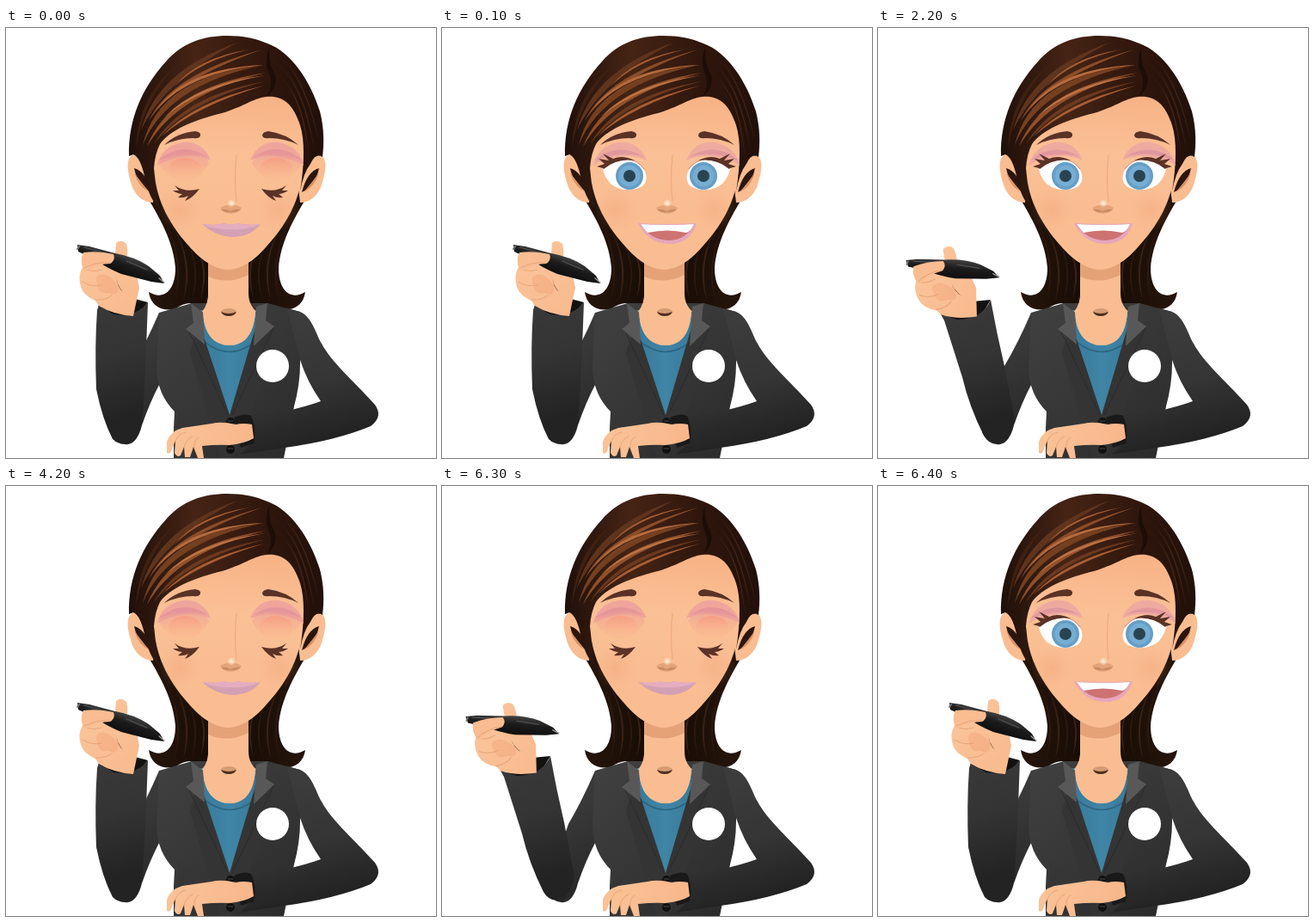
Write an HTML page with a canvas that moves like this. It is 500 px wide and 500 px high and loops after 8 s.

```html
<!DOCTYPE html>
<html lang="en">
<head>
<meta charset="utf-8">
<title>Blinking presenter</title>
<style>
html, body { margin: 0; width: 100%; height: 100%; overflow: hidden; background: #fff; }
canvas { display: block; width: 500px; height: 500px; }
</style>
</head>
<body>
<canvas id="stage" width="500" height="500"></canvas>
<script>
const ctx = document.getElementById('stage').getContext('2d');
const LOOP = 8000;
const SKIN = '#f9bd91', SKIN_SHADE = '#e7a579', LASH = '#5a3226';
const ELBOW = [134, 475];

// The forearm is either upright or leaning out, with the hand turned to suit.
const UPRIGHT = {
  turn: 0, shift: [0, 0],
  cuff: 'M107 323L150 315L165 319L150 337L125 335Z',
  sleeve: 'M108 322L106 328Q103 370 105 420Q112 455 124 478Q132 486 144 483Q154 480 159 455L163 372L165 319Q152 336 125 333Z'
};
const LEANING = {
  turn: -13.5, shift: [0, 0],
  cuff: 'M73 333L110 318L131 316L118 338L85 340Z',
  sleeve: 'M73 333L77 340L98 406Q106 440 123 474Q130 486 142 483Q154 481 159 455L147 393Q138 355 131 316Q122 338 92 339Z'
};
const REACHING = { ...LEANING, shift: [-5, -2] };

// Each pose holds until the next one starts.
const POSES = [
  { at: 0, open: false, arm: UPRIGHT },
  { at: 100, open: true, arm: UPRIGHT },
  { at: 2100, open: false, arm: LEANING },
  { at: 2200, open: true, arm: LEANING },
  { at: 4200, open: false, arm: UPRIGHT },
  { at: 4300, open: true, arm: UPRIGHT },
  { at: 6300, open: false, arm: REACHING },
  { at: 6400, open: true, arm: UPRIGHT }
];

function fill(d, colour) {
  ctx.fillStyle = colour;
  ctx.fill(new Path2D(d));
}

function line(d, colour, width = 1) {
  ctx.strokeStyle = colour;
  ctx.lineWidth = width;
  ctx.lineCap = 'round';
  ctx.stroke(new Path2D(d));
}

function oval(x, y, rx, ry, colour) {
  ctx.fillStyle = colour;
  ctx.beginPath();
  ctx.ellipse(x, y, rx, ry, 0, 0, Math.PI * 2);
  ctx.fill();
}

function blend(x0, y0, x1, y1, ...colours) {
  const g = ctx.createLinearGradient(x0, y0, x1, y1);
  colours.forEach((c, i) => g.addColorStop(i / (colours.length - 1), c));
  return g;
}

function glow(x, y, r, rgb, alpha) {
  const g = ctx.createRadialGradient(x, y, 0, x, y, r);
  g.addColorStop(0, `rgba(${rgb},${alpha})`);
  g.addColorStop(1, `rgba(${rgb},0)`);
  oval(x, y, r, r, g);
}

// A curved lock of hair, pointed at both ends.
function lock(x0, y0, cx, cy, x1, y1, w, colour) {
  fill(`M${x0} ${y0}Q${cx - w} ${cy - w} ${x1} ${y1}Q${cx + w} ${cy + w} ${x0} ${y0}Z`, colour);
}

function mirrored(axis, draw) {
  draw();
  ctx.save();
  ctx.translate(axis * 2, 0);
  ctx.scale(-1, 1);
  draw();
  ctx.restore();
}

function backHair() {
  mirrored(257, () => {
    fill('M160 190C180 222 195 250 197 279C197 306 183 317 166 307C168 322 180 330 196 327Q206 320 214 320Q222 326 236 321L250 260L190 150Z',
      blend(175, 0, 240, 0, '#24140b', '#170c06'));
    for (let i = 0; i < 4; i++) {
      const x = 182 + i * 10;
      lock(x, 218 + i * 9, x + 27, 270, x + 14, 318 - i, 2.5, i % 2 ? '#3a2113' : '#2c180d');
    }
  });
}

function ears() {
  mirrored(256.5, () => {
    fill('M148 147C140 151 140 162 145 179C149 195 160 203 171 203L176 160Z', SKIN);
    fill('M149 163Q163 167 169 191Q153 183 149 163Z', '#2b150d');
    fill('M149 168Q156 178 167 191Q154 185 149 168Z', '#d99268');
  });
}

function neck() {
  fill('M235 262V312Q234 326 222 336L240 375H280L294 332Q282 324 282 308V262Z', SKIN);
  fill('M235 272Q258 288 282 272V287Q258 299 235 289Z', '#e5a276');
  oval(259, 330, 9, 4, '#d59c74');
  fill('M250 330Q259 334 268 330Q266 335 259 335Q252 335 250 330Z', '#50301f');
}

function face() {
  fill('M172 148C170 190 185 220 207 247C222 265 238 280 258 281C279 280 294 265 309 247C332 220 346 190 346 148C350 105 325 72 300 74L180 112Z',
    blend(270, 80, 258, 280, '#f7b386', '#fbc095', SKIN, SKIN));
  glow(202, 211, 25, '239,145,105', 0.24);
  glow(317, 211, 25, '239,145,105', 0.22);
  line('M268 148Q265 175 268 201', '#efaa7e', 1.2);
  fill('M249 209Q256 205 262 206Q268 205 274 209Q271 215 262 216Q253 216 249 209Z', '#e5a47a');
  fill('M250 211Q256 210 261 213Q267 210 273 211Q268 215 261 214Q254 215 250 211Z', '#c98b64');
  glow(262, 204, 5, '255,246,226', 0.95);
  fill('M184 136Q198 122 220 120Q227 121 226 125Q225 129 218 128Q200 128 184 136Z', LASH);
  fill('M340 136Q326 123 305 120Q298 121 298 125Q299 129 306 128Q324 128 340 136Z', LASH);
}

function frontHair() {
  fill('M143 149C142 106 158 70 186 39C205 17 230 9 257 9C276 9 290 12 304 18C332 28 354 62 365 97C370 117 370 134 368 150Q360 145 354 158Q346 168 342 190Q350 139 342 113C333 85 319 78 302 80C287 82 275 92 251 99C218 107 190 119 179 135Q173 147 172 163L177 208Q166 198 161 172Q156 150 148 147Z',
    blend(145, 0, 369, 0, '#20100a', '#462415', '#31170d', '#211009'));
  lock(157, 119, 180, 55, 269, 17, 5, '#5f341d');
  lock(166, 108, 194, 57, 298, 25, 3, '#8b4d29');
  lock(159, 136, 183, 61, 299, 43, 5, '#754020');
  lock(176, 94, 212, 49, 299, 43, 2.4, '#b46b3e');
  lock(164, 138, 194, 73, 302, 52, 4, '#90502b');
  lock(185, 103, 223, 67, 301, 55, 2, '#bd7244');
  lock(172, 135, 207, 82, 302, 62, 3, '#6b391f');
  lock(181, 126, 219, 88, 300, 67, 2.2, '#a65d35');
  lock(196, 68, 224, 36, 283, 25, 1.5, '#a45d34');
  lock(151, 140, 157, 80, 200, 42, 3, '#40200f');
  for (let i = 0; i < 5; i++) {
    lock(309, 26 + i * 6, 344, 44 + i * 6, 364 - i * 3, 132 + i * 4, 2, i % 2 ? '#1f0f08' : '#48291a');
  }
  fill('M306 23Q300 39 305 51Q312 65 303 80Q316 69 313 55Q305 42 306 23Z', '#1d0d07');
}

function lashes(open) {
  if (open) {
    fill('M187 163L180 161L189 158L182 152L194 154L187 146L199 152Q210 147 224 154Q203 151 188 164Z', LASH);
  } else {
    fill('M225 187Q209 192 196 183L201 189L194 189Q200 193 205 193L200 197Q207 198 212 195L208 201Q217 198 225 187Z', LASH);
  }
}

function eyes(open) {
  mirrored(261, () => {
    fill('M176 160Q180 138 205 133Q229 131 238 154Q218 145 194 152Q180 156 176 160Z', open ? '#efaaa0' : '#f0a59c');
    fill('M177 154Q204 131 235 150Q210 142 177 154Z', 'rgba(205,130,155,.45)');
    if (open) {
      fill('M186 160C195 150 216 149 229 158C239 166 240 178 233 184C222 191 204 189 195 180Q188 172 186 160Z', '#fff');
      oval(218, 172, 16, 16, '#659ec6');
      oval(218, 172, 12.5, 12.5, '#76add2');
      oval(218, 172, 7, 7, '#294451');
      line('M187 160Q198 151 214 152Q228 154 235 164', '#c9877a');
    } else {
      fill('M178 158Q188 140 211 141Q230 142 236 157Q228 174 211 178Q189 178 178 158Z',
        blend(0, 140, 0, 178, 'rgba(228,146,152,.7)', 'rgba(249,176,141,.1)'));
      oval(208, 164, 19, 13, blend(0, 151, 0, 177, 'rgba(249,148,122,.6)', 'rgba(250,181,142,0)'));
    }
    lashes(open);
  });
}

function mouth(open) {
  if (!open) {
    fill('M228 228Q245 230 254 227Q261 230 269 227Q281 230 296 228Q284 243 263 243Q243 242 228 228Z', '#d4a0b3');
    fill('M228 228Q245 230 254 227Q261 230 269 227Q281 230 296 228Q281 235 262 234Q243 235 228 228Z', '#e4adc0');
    return;
  }
  fill('M228 227Q261 229 296 227Q289 251 264 251Q239 250 228 227Z', '#e8a6bb');
  fill('M231 228Q262 230 293 228Q285 246 264 247Q241 246 231 228Z', '#cd7372');
  fill('M231 228Q262 230 293 228Q289 237 284 238Q262 233 239 238Q235 234 231 228Z', '#fff');
}

function shirt() {
  const teal = blend(230, 0, 290, 0, '#397b9b', '#4085a6', '#397b9b');
  fill('M226 328H293L291 375L260 452L231 372Z', teal);
  fill('M229 330C230 358 244 369 260 369C276 369 288 358 290 330L282 318H236Z', SKIN);
  neckSkin();
  line('M231 365Q260 388 289 365', '#2d6681', 1.6);
}

// The neck is kept inside the round neckline.
function neckSkin() {
  ctx.save();
  ctx.clip(new Path2D('M200 240H320V330H290C288 358 276 369 260 369C244 369 230 358 229 330H200Z'));
  neck();
  ctx.restore();
}

function jacket() {
  fill('M178 331L216 320H304L342 330V390Q342 414 335 440L323 500H195V465L196 446Q176 426 175 396Z',
    blend(175, 320, 330, 490, '#414141', '#373737', '#2c2c2c'));
  shirt();
  fill('M231 362L260 450L262 500H250L214 378L222 350Z', '#343434');
  fill('M291 345L260 450L264 500L304 395L310 345Z', '#343434');
  line('M212 351L258 450', '#2b2b2b');
  line('M311 349L263 450', '#2b2b2b');
  fill('M215 320L229 331L231 368L209 350L218 343Z', '#585858');
  fill('M304 320L291 324L288 370L312 347L302 340Z', '#585858');
  for (const y of [458, 490]) {
    oval(261, y, 5, 5, '#111');
    line(`M258 ${y - 1}H264`, '#454545');
  }
}

function restingArm() {
  fill('M327 326L342 330C356 336 360 355 367 367C378 388 402 408 429 438Q439 452 424 463Q383 480 324 488L272 496L288 481Q289 465 282 452Q330 447 366 434Q350 411 342 386Z',
    blend(340, 340, 380, 485, '#3c3c3c', '#353535', '#202020'));
  fill('M265 453Q278 447 285 451Q292 465 288 483L273 488Z', '#191919');
  fill('M286 461Q276 459 267 461Q251 457 239 460L205 465Q191 469 187 481L187 494Q191 497 193 489L197 480L196 494Q199 500 203 497L207 487L208 499H214L218 487L223 500H230L228 486Q246 484 260 485Q278 483 288 477Z',
    blend(190, 462, 280, 490, '#fac397', '#f8b78b'));
  line('M197 480Q201 471 209 470', SKIN_SHADE);
  line('M207 488Q209 478 217 475', SKIN_SHADE);
  line('M219 488Q218 479 224 476', SKIN_SHADE);
}

function raisedArm({ turn, shift, cuff, sleeve }) {
  fill('M178 331Q163 366 147 393L121 470Q130 486 142 484Q153 482 158 462Q167 436 179 413V345Z',
    blend(145, 375, 185, 460, '#393939', '#292929'));
  ctx.save();
  ctx.translate(...shift);
  fill(cuff, '#111');
  fill(sleeve, blend(0, 340, 40, 480, '#3a3a3a', '#343434', '#232323'));
  ctx.translate(...ELBOW);
  ctx.rotate(turn * Math.PI / 180);
  ctx.translate(-ELBOW[0], -ELBOW[1]);
  hand();
  ctx.restore();
}

function hand() {
  fill('M92 260Q86 267 89 278Q83 288 87 301Q90 311 104 317L108 323Q124 333 148 335L155 302L151 282L139 274Q143 261 140 251Q134 245 128 250L127 263Z',
    blend(90, 270, 150, 330, '#fbc49a', '#f8ba8d'));
  fill('M105 290Q116 280 130 299Q133 314 119 308Q105 311 105 290Z', 'rgba(239,160,117,.4)');
  line('M90 279Q100 285 111 281', SKIN_SHADE);
  line('M89 295Q99 302 111 299', SKIN_SHADE);
  line('M104 316Q116 317 123 311', SKIN_SHADE);
  fill('M127 286Q129 299 136 307Q130 303 127 286Z', '#4b2c20');
  fill('M83 252L97 254L127 262Q150 266 166 277L179 288L184 297L169 295L134 286Q117 279 101 268L84 260Z',
    blend(130, 262, 124, 280, '#404040', '#1b1b1b', '#111'));
  line('M85 254L83 257', '#777', 2);
  line('M91 255L124 265', '#515151', 1.3);
  line('M140 271L164 281', '#494949', 1.5);
  line('M178 291L184 296', '#999', 1.4);
  fill('M90 261Q108 259 125 263Q128 270 121 274Q108 274 91 283Q85 270 90 261Z', SKIN);
  line('M91 279Q107 271 122 273', SKIN_SHADE);
}

function draw(now) {
  const time = now % LOOP;
  const pose = POSES.findLast(p => p.at <= time);
  ctx.fillStyle = '#fff';
  ctx.fillRect(0, 0, 500, 500);
  backHair();
  raisedArm(pose.arm);
  jacket();
  ears();
  face();
  frontHair();
  eyes(pose.open);
  mouth(pose.open);
  restingArm();
  oval(310, 393, 19, 19, '#fff');
  requestAnimationFrame(draw);
}

requestAnimationFrame(draw);
</script>
</body>
</html>
```
